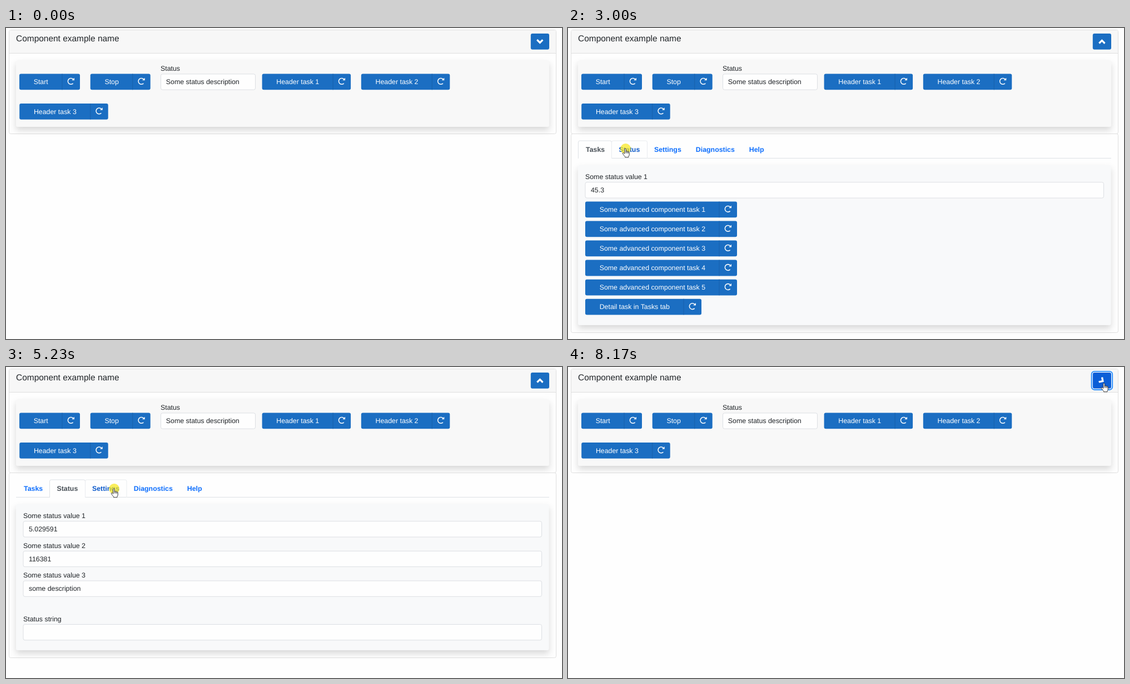
These frames come from a looping animation (1000 px wide and 560 px high, 8.24 s). An HTML page:

```html
<!DOCTYPE html>
<html lang="en">
<head>
<meta charset="utf-8">
<title>Component example</title>
<style>
html, body { margin: 0; width: 100%; height: 100%; overflow: hidden; background: #fefefe; }
svg { display: block; width: 1000px; height: 560px; font: 12.37px "Liberation Sans", Arial, sans-serif; text-rendering: geometricPrecision; }
text { fill: #212529; white-space: pre; }
.title { font-size: 15.46px; }
.card { fill: none; stroke: #dfdfdf; }
.panel { filter: drop-shadow(0 6px 6px rgba(0, 0, 0, .15)); }
.field { fill: #fefefe; stroke: #dcdfe3; }
.btn rect { fill: #1b6ec2; }
.btn line { stroke: #1861ac; }
.btn text, .btn path { fill: #fff; }
.line { stroke: #dee2e6; }
.tab text { font-weight: 700; fill: #0d6efd; }
.tab path { fill: none; stroke: none; }
.tab.hover text { fill: #0a58ca; }
.tab.hover path { stroke: #e9ecef; }
.tab.active text { fill: #495057; }
.tab.active path { fill: #fefefe; stroke: #dee2e6; }
.cursor { fill: #fff; stroke: #222; stroke-width: .9; stroke-linejoin: round; }
</style>
</head>
<body>
<svg id="stage" viewBox="0 0 1000 560"></svg>
<script>
const LOOP = 8240;
const stage = document.getElementById('stage');
const RELOAD = 'M4 0a4 4 0 1 0 2.84 6.84l-.72-.72A3 3 0 1 1 6.09 1.91L5 3h3V0L6.81 1.19A4 4 0 0 0 4 0z';

const text = (x, y, s, attrs = '') => `<text x="${x}" y="${y}" ${attrs}>${s}</text>`;
const rect = (x, y, w, h, attrs) => `<rect x="${x}" y="${y}" width="${w}" height="${h}" ${attrs}/>`;

const button = (x, y, w, label) => `<g class="btn">
  ${rect(x, y, w, 28.8, 'rx="3"')}
  <line x1="${x + w - 32}" x2="${x + w - 32}" y1="${y}" y2="${y + 28.8}"/>
  ${text(x + 25.7, y + 18.7, label)}
  <path d="${RELOAD}" transform="translate(${x + w - 22.4} ${y + 7.2}) scale(1.546)"/></g>`;

const field = (y, label, value = '', id = '') =>
  text(31, y - 5.2, label) +
  rect(31, y + .5, 932.5, 28.3, 'rx="3" class="field"') +
  text(41, y + 18.8, value, id && `id="${id}"`);

const panel = (name, bottom, body) => `<g id="${name}">
  ${rect(5.5, 190.5, 984, bottom - 190, 'rx="3" class="card"')}
  ${rect(18, 247, 958.5, bottom - 260, 'rx="3" fill="#f8f9fa" class="panel"')}${body}</g>`;

const tabs = [
  { name: 'Tasks', x: 18.5, w: 60, tx: 32 },
  { name: 'Status', x: 78.5, w: 64, tx: 91.5 },
  { name: 'Settings', x: 142.5, w: 74.5, tx: 155 },
  { name: 'Diagnostics', x: 217, w: 96, tx: 229.8 },
  { name: 'Help', x: 313, w: 52, tx: 325.8 }
];
const tabMark = ({ name, x, w, tx }) => `<g class="tab" id="tab${name}">
  <path d="M${x} 235V206q0-3 3-3h${w - 6}q3 0 3 3V235"/>${text(tx, 222.9, name)}</g>`;

const row = i => 277.3 + 53.6 * i;
const taskButtons = [1, 2, 3, 4, 5].map(i =>
  button(31, 277.4 + 35.05 * i, 273, 'Some advanced component task ' + i)).join('');

stage.innerHTML = `
  ${rect(5.5, 3.5, 984, 187, 'rx="3" class="card"')}
  ${rect(6, 4, 983, 41, 'rx="2" fill="#f7f7f7"')}
  <path d="M6 45.5H989" stroke="#dfdfdf"/>
  ${text(18, 24.3, 'Component example name', 'class="title"')}
  ${rect(18, 58, 959, 120, 'rx="3" fill="#f8f8f8" class="panel"')}
  ${button(24, 82.5, 109, 'Start')}${button(151.7, 82.5, 108, 'Stop')}
  ${text(278, 77.3, 'Status')}
  ${rect(278.5, 82.9, 170, 28.3, 'rx="3" class="field"')}
  ${text(287.8, 101.2, 'Some status description')}
  ${button(460.6, 82.5, 159.5, 'Header task 1')}${button(638.8, 82.5, 159.5, 'Header task 2')}
  ${button(24.2, 136, 159.5, 'Header task 3')}
  <g id="details">
    ${panel('Tasks', 548, field(row(0), 'Some status value 1', '45.3') + taskButtons + button(31, 487.7, 209, 'Detail task in Tasks tab'))}
    ${panel('Status', 523, field(row(0), 'Some status value 1', '', 'value1') +
      field(row(1), 'Some status value 2', '', 'value2') +
      field(row(2), 'Some status value 3', 'some description') + field(463, 'Status string') +
      `<g id="spin">${rect(942, 282, 12.5, 20, 'fill="#efefef"')}<path d="M945.5 289.5l2.8-3.2 2.8 3.2zM945.5 294.5l2.8 3.2 2.8-3.2z" fill="#444"/></g>`)}
    ${panel('Settings', 445, [1, 2, 3].map(i => field(row(i - 1), 'Some setting value ' + i, i * 10)).join(''))}
    ${panel('Diagnostics', 337, field(row(0), 'Some diagnostic message', 'TODO: Some diagnostic message needs to be placed here'))}
    ${panel('Help', 337, field(row(0), 'Some help', 'TODO: Provide some help'))}
    <path class="line" d="M18 234.5H977"/>
    ${tabs.map(tabMark).join('')}
  </g>
  <rect id="ring" fill="#258cfb"/><rect id="gap" fill="#fff"/>
  ${rect(943.8, 10, 33.2, 28.8, 'rx="3" id="toggle"')}
  <path id="chevron" fill="#fff" d="M-4.6-4.25L-6.2-1.9 0 4.25 6.2-1.9 3.9-4.25 0-.4-3.9-4.25z"/>
  <circle id="click" r="9.3" fill="#f8e71c" opacity=".72"/>
  <g id="pointer">
    <path id="hand" class="cursor" d="M-1.2 9.4V1.2a1.2 1.2 0 0 1 2.4 0V5.6a1.1 1.1 0 0 1 2.2.3a1 1 0 0 1 2 .4a1 1 0 0 1 1.8.6V11q0 2-1.3 3.2V15.8H-.4V14.6Q-2.6 12.6-4.6 9.2q-.4-1.5 1-1.5q1 .1 2.4 1.7zM1.2 5.6V8.6M3.4 6V8.6M5.4 6.4V8.8"/>
    <path id="arrow" class="cursor" d="M0 0V13l3-2.8 2 4.6 2-.9-2-4.5H9.2z"/>
    <path id="beam" fill="none" stroke="#222" stroke-width="1.3" d="M-4-6.5h2.5q1.5 0 1.5 1.5q0-1.5 1.5-1.5H4M0-5V5.5M-4 7h2.5q1.5 0 1.5-1.5q0 1.5 1.5 1.5H4"/>
  </g>`;

const $ = id => document.getElementById(id);
const show = (id, on) => { $(id).style.display = on ? '' : 'none'; };
const clamp = v => Math.max(0, Math.min(1, v));
const setText = (id, s) => { if ($(id).textContent !== s) $(id).textContent = s; };

// time, x, y of the pointer
const path = [
  [0, 1012, 110], [60, 1004, 96], [310, 964, 29], [600, 964, 29], [1690, 44, 219],
  [2170, 44, 219], [2520, 99, 219], [2590, 99, 219], [2730, 103, 217], [3400, 103, 217],
  [3780, 157, 303], [4250, 28, 300], [4400, 4, 296], [5090, 194, 219], [5400, 194, 219],
  [5720, 244, 218], [6280, 244, 218], [6670, 343, 218], [7370, 343, 218], [7800, 964, 29],
  [LOOP, 964, 29]
];
const presses = [330, 1900, 2930, 5160, 5970, 6925, 7870];
const switches = [[0, 'Help'], [2050, 'Tasks'], [3110, 'Status'], [5300, 'Settings'], [6045, 'Diagnostics'], [7060, 'Help']];
const OPEN = 460, CLOSE = 8030;

function pointerAt(t) {
  const i = path.findIndex(p => p[0] > t);
  const [t0, x0, y0] = path[i - 1], [t1, x1, y1] = path[i];
  const p = (t - t0) / (t1 - t0), e = p * p * (3 - 2 * p);
  return [x0 + (x1 - x0) * e, y0 + (y1 - y0) * e];
}

function turn(t, start) {
  return 1 - (1 - clamp((t - start) / 350)) ** 2.25;
}

function drawToggle(t, over) {
  const focus = t >= 7870 ? clamp((t - 7870) / 100)
    : t < 1900 ? clamp((t - 330) / 100)
    : (1 - clamp((t - 1900) / 150)) ** 1.4;
  [['ring', 3.1], ['gap', 1.24]].forEach(([id, spread]) => {
    const s = spread * focus, el = $(id);
    el.setAttribute('x', 943.8 - s);
    el.setAttribute('y', 10 - s);
    el.setAttribute('width', 33.2 + 2 * s);
    el.setAttribute('height', 28.8 + 2 * s);
    el.setAttribute('rx', 3 + s);
    show(id, focus > 0);
  });
  const k = over ? 1 : focus;
  $('toggle').setAttribute('fill', `rgb(${27 - 16 * k},${110 - 16 * k},${194 + 21 * k})`);
  const angle = -180 * (turn(t, OPEN) - turn(t, CLOSE));
  $('chevron').setAttribute('transform', `translate(960.3 24.4) rotate(${angle})`);
}

function draw(t) {
  const [x, y] = pointerAt(t);
  const inside = (l, top, w, h) => x >= l && x < l + w && y >= top && y < top + h;
  const open = t >= OPEN && t < CLOSE;
  const current = switches.filter(s => s[0] <= t).pop()[1];

  show('details', open);
  let overTab = false;
  tabs.forEach(({ name, x: left, w }) => {
    const over = open && inside(left, 203, w, 32);
    overTab = overTab || over;
    show(name, name === current);
    $('tab' + name).setAttribute('class', 'tab' + (name === current ? ' active' : over ? ' hover' : ''));
  });

  const tick = Math.floor((t - 3660) / 241.67);
  setText('value1', (1.825162 + 3.204429 * tick / 6).toFixed(6));
  setText('value2', String(Math.round(116032 + 349 * tick / 6)));

  const overField = open && inside(31, 277, 933, 30);
  show('spin', overField);
  const overToggle = inside(943, 10, 34, 29);
  drawToggle(t, overToggle);

  const overButton = overToggle || overTab || inside(460, 82, 160, 29) || inside(638, 82, 160, 29);
  show('hand', overButton);
  show('beam', overField);
  show('arrow', !overButton && !overField);
  $('pointer').setAttribute('transform', `translate(${x} ${y})`);

  show('click', presses.some(p => t >= p && t < p + 240));
  $('click').setAttribute('cx', x + .6);
  $('click').setAttribute('cy', y + .3);
}

const start = performance.now();
function frame() {
  draw((performance.now() - start) % LOOP);
  requestAnimationFrame(frame);
}
frame();
</script>
</body>
</html>
```
